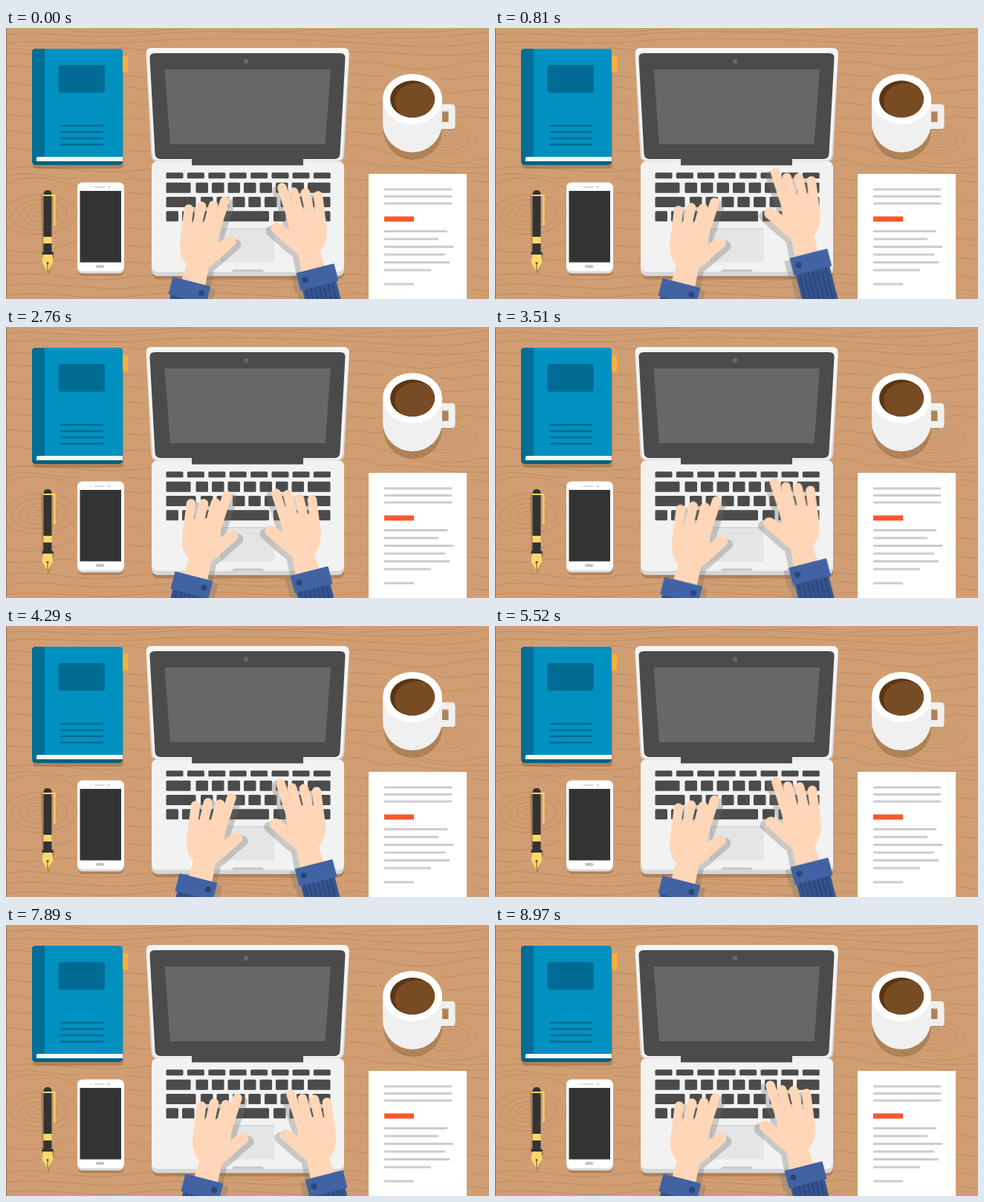
An HTML page without scripts that plays this animation: 650x366 px, repeating every 9000 ms.

```html
<!DOCTYPE html>
<html lang="en">
<head>
<meta charset="utf-8">
<title>Typing at a desk</title>
<style>
html, body { margin: 0; width: 100%; height: 100%; overflow: hidden; background: #d09e72; }
svg { display: block; width: 650px; height: 366px; }

.grain { fill: none; stroke: #ba8a5f; stroke-width: .8; }
.shade { fill: #5b3a1c; opacity: .27; }
.keys { fill: #4b4b4b; }
.keys rect { height: 14px; rx: 1.5px; }
.keys rect:not([width]) { width: 16.5px; }
.keys .low rect { width: 23px; height: 8px; }
.text { stroke: #ccc; stroke-width: 3; }

.left { animation: left 9s ease-in-out infinite; filter: drop-shadow(7px 4px 0 rgba(112, 116, 108, .32)); }
.right { animation: right 9s ease-in-out infinite; filter: drop-shadow(-7px 4px 0 rgba(112, 116, 108, .32)); }

.finger { stroke: #ffd7b8; stroke-width: 12.5; stroke-linecap: round; }
.finger line { --a: 5px; animation: tap 3s ease-in-out infinite; }
.finger .steady { animation-name: drum; }

@keyframes tap {
  0%, 14%, 100% { transform: none; }
  7% { transform: translateY(var(--a)); }
}
@keyframes drum {
  0%, 33%, 73%, 100% { transform: none; }
  23%, 43%, 63% { transform: translateY(3px); }
  53% { transform: translateY(2px); }
  92% { transform: translateY(4px); }
}
@keyframes left {
  0% { transform: translate(0, 0); }
  4.5% { transform: translate(-7px, -3px); }
  11% { transform: translate(3px, 3px); }
  18.33% { transform: translate(7px, 8px); }
  25% { transform: translate(-11px, 1px); }
  30.67% { transform: translate(3px, -6px); }
  35% { transform: translate(-1px, 0); }
  41.7% { transform: translate(6px, 2px); }
  47.67% { transform: translate(9px, -2px); }
  58% { transform: translate(1px, 3px); }
  66% { transform: translate(1px, -2px); }
  74.33% { transform: translate(5px, -9px); }
  79% { transform: translate(0, -3px); }
  87.67% { transform: translate(17px, 0); }
  95.6% { transform: translate(-7px, 2px); }
  99.67% { transform: translate(2px, 0); }
  100% { transform: translate(0, 0); }
}
@keyframes right {
  0% { transform: translate(0, 0); }
  10.5% { transform: translate(6px, -21px); }
  18.33% { transform: translate(0, -1px); }
  25% { transform: translate(-6px, -7px); }
  30.67% { transform: translate(-8px, 5px); }
  37% { transform: translate(5px, -6px); }
  47.67% { transform: translate(-2px, -3px); }
  57% { transform: translate(7px, -3px); }
  66% { transform: translate(7px, -8px); }
  74.33% { transform: translate(-2px, -14.5px); }
  79% { transform: translate(-2px, -17px); }
  87.67% { transform: translate(12px, 13px); }
  94% { transform: translate(2px, -12px); }
  99.67% { transform: translate(-1px, 1px); }
  100% { transform: translate(0, 0); }
}
</style>
</head>
<body>
<svg viewBox="0 0 650 366">
<defs>
  <clipPath id="brew"><ellipse cx="547" cy="96" rx="30" ry="25"/></clipPath>
  <g id="arm">
    <path fill="#ffd7b8" d="M238 266L234.300 286C233 301 236 312 243 319L235 345L267 354L273 323C281 317 287 312 292 307L308 293C313 286 305 278 297 282L285 291L288 263Z"/>
    <g transform="translate(224.500 336) rotate(14.300)">
      <path fill="#36558f" d="M3 20H50V95H3Z"/>
      <path stroke="#284579" stroke-width="1.600" d="M9 22V95M15 22V95M21 22V95M27 22V95M33 22V95M39 22V95M45 22V95"/>
      <rect width="52.500" height="24.500" rx="1" fill="#4163a3"/>
      <circle cx="43" cy="11.700" r="4" fill="#294679"/>
    </g>
  </g>
  <g id="knot">
    <ellipse rx="7" ry="4"/>
    <ellipse rx="15" ry="9"/>
    <path d="M-26 2C-22-15 14-20 25-3C30 14-18 23-26 2Z"/>
    <path d="M-38 3C-30-23 22-29 38-5C43 21-26 33-38 3Z"/>
    <path d="M-54 4C-38-34 30-38 52-6C56 29-34 41-54 4Z"/>
  </g>
</defs>

<rect width="650" height="366" fill="#d09e72"/>
<g class="grain">
  <path d="M0 9C50 2 92 17 190 9S350 4 430 10S560 16 650 5"/>
  <path d="M0 20C60 14 120 25 190 18S390 15 470 20S590 30 650 17"/>
  <path d="M80 2C130 10 190 4 245 1M300 5C350 10 400 0 450 3M470 10C520 2 570 9 620 1"/>
  <path d="M0 35C20 31 30 38 40 35M150 29C166 24 178 32 192 29M458 33C510 27 560 46 650 32"/>
  <path d="M0 52C16 49 24 55 38 52M157 66C170 61 182 70 194 65M459 46C500 40 535 62 582 54S625 42 650 46"/>
  <path d="M0 75C14 71 22 80 38 76M157 82C174 77 182 87 196 82M457 64C475 60 490 67 511 64M582 68C608 74 626 62 650 65"/>
  <path d="M0 96C16 92 26 101 38 97M157 103C172 97 184 108 197 101M457 82C476 77 490 85 509 82M588 86C610 92 630 80 650 84"/>
  <path d="M0 119C14 115 24 123 38 118M157 124C170 118 182 129 198 122M456 103C472 97 490 108 508 101M604 108C620 104 634 111 650 107"/>
  <path d="M0 140C12 136 25 145 38 140M157 146C172 141 182 150 199 144M455 122C472 117 490 128 508 120M604 123C622 114 636 124 650 121"/>
  <path d="M0 163C14 159 26 168 38 162M157 168C172 162 184 171 200 165M453 143C475 135 490 148 510 141S530 177 580 182S630 172 650 178"/>
  <path d="M0 190C60 181 116 203 196 190M0 200C40 190 70 207 97 202M455 160C482 153 500 167 518 169S570 196 650 187"/>
  <path d="M0 211C26 196 69 201 96 217M158 205C172 199 184 211 196 204M455 180C478 172 492 190 520 187S580 199 650 196"/>
  <path d="M158 224C170 218 184 229 196 222M455 205C466 200 477 209 488 204M620 208C632 203 640 211 650 207"/>
  <path d="M158 247C170 240 184 252 196 245M455 230C466 224 477 234 488 228M620 234C632 228 640 238 650 232"/>
  <path d="M158 272C172 266 184 276 196 270M455 255C466 250 478 260 488 253M620 260C632 253 640 263 650 258"/>
  <path d="M0 298C22 308 60 302 96 287M158 296C172 290 182 301 196 294M455 281C466 275 478 285 488 279M620 286C632 281 640 290 650 285"/>
  <path d="M0 316C30 324 70 309 97 315M158 318C172 312 184 323 196 317M455 307C466 301 478 312 488 306M620 312C632 306 640 317 650 310"/>
  <path d="M0 334C60 325 98 348 160 337S300 351 370 342S455 329 488 335M620 337C632 331 640 341 650 336"/>
  <path d="M0 348C60 340 120 358 190 349S350 355 410 350S462 341 488 348M620 355C632 350 640 358 650 354"/>
  <path d="M0 361C60 354 110 370 180 361S340 362 400 364S462 354 488 360"/>
  <use href="#knot" x="44" y="252"/>
  <use href="#knot" transform="translate(595 151) scale(.72)"/>
</g>
<path d="M.5 0V366" stroke="#8f7158"/>

<!-- notebook -->
<rect class="shade" x="36" y="40" width="122" height="150" rx="5"/>
<rect x="152" y="38" width="12" height="22" fill="#fbb03b"/>
<rect x="35" y="28" width="122" height="157" rx="5" fill="#00627f"/>
<path fill="#0091c1" d="M40 28H152Q157 28 157 33V174H35V33Q35 28 40 28Z"/>
<path fill="#006e96" d="M40 28H52V174H41V180H35V33Q35 28 40 28Z"/>
<path fill="#f7f7f7" d="M43 174H157V180H41V176Q41 174 43 174Z"/>
<rect x="70.500" y="50" width="62.500" height="37.500" rx="4" fill="#006b92"/>
<path stroke="#006b92" stroke-width="2.600" d="M73 132H131M73 140.500H131M73 149H131M73 157.500H131"/>

<!-- pen -->
<path class="shade" d="M47 226H61V303H65V309L57 334L49 309Z"/>
<path fill="#333" d="M50.500 282V224Q51 219 56 219T61.500 224V282ZM50.500 291H61.500V302.500H63.500V306H48.500V302.500H50.500Z"/>
<path fill="#fbd86b" d="M50.500 282H61.500V291H50.500ZM50 306H62L63.500 316L56 330L48.500 316Z"/>
<path fill="none" stroke="#fbd86b" stroke-width="2" d="M50 226H65.500V267"/>
<path stroke="#6b5326" d="M56 318V329"/>
<circle cx="56" cy="317.500" r="1.600" fill="#6b5326"/>

<!-- phone -->
<rect class="shade" x="97" y="216" width="62" height="119" rx="7"/>
<rect x="96" y="209" width="63" height="122.500" rx="7" fill="#dcdcdc"/>
<rect x="96" y="208.500" width="63" height="120" rx="7" fill="#fff"/>
<rect x="99.500" y="220" width="55.500" height="96.500" fill="#333"/>
<rect x="121" y="320" width="11.500" height="4" rx="2" fill="#c4c4c4"/>
<path stroke="#ccc" stroke-width="1.500" stroke-linecap="round" d="M119 215H132"/>
<circle cx="138.500" cy="215" r="1.500" fill="#ccc"/>
<circle cx="114" cy="215" r=".8" fill="#ccc"/>

<!-- laptop -->
<rect class="shade" x="197" y="200" width="258" height="139.500" rx="8"/>
<path fill="#d9d9d9" d="M196 27H454Q462 27 462 36L455 172Q454 180 447 180H203Q196 180 195.500 172L188.500 36Q188 27 196 27Z"/>
<path fill="#f5f5f5" d="M196 27H454Q462 27 461.500 35L453 171Q452 179 445 179H205Q198 179 197.500 171L189 35Q188 27 196 27Z"/>
<path fill="#4b4b4b" d="M200 34H450Q457 34 456.500 41L449.500 170Q449 177 442 177H208Q201 177 200.500 170L193.500 41Q193 34 200 34Z"/>
<path fill="#676767" d="M213.500 56H437L429.500 157H221Z"/>
<circle cx="323" cy="45" r="3.300" fill="#676767"/>
<rect x="196" y="180" width="259" height="155" rx="8" fill="#d6d6d6"/>
<rect x="196" y="180" width="259" height="149.500" rx="8" fill="#f2f2f2"/>
<path fill="#4b4b4b" d="M250 176H400V185.500H250Z"/>
<g class="keys">
  <g class="low" transform="translate(0 195.300)">
    <rect x="215.500"/><rect x="243.900"/><rect x="272.300"/><rect x="300.700"/>
    <rect x="329.100"/><rect x="357.500"/><rect x="385.500"/><rect x="413.800"/>
  </g>
  <g transform="translate(0 208.700)">
    <rect x="215.500" width="33"/><rect x="255.500"/><rect x="277"/><rect x="298.500"/><rect x="320"/>
    <rect x="341.500"/><rect x="363"/><rect x="384.500"/><rect x="406" width="30.500"/>
  </g>
  <g transform="translate(0 228)">
    <rect x="215.500" width="40"/><rect x="262"/><rect x="283.500"/><rect x="305"/><rect x="326.300"/>
    <rect x="348"/><rect x="369.500"/><rect x="391"/><rect x="412.500" width="24"/>
  </g>
  <g transform="translate(0 247.300)">
    <rect x="215.500"/><rect x="237"/><rect x="258.500" width="95.500"/>
    <rect x="360"/><rect x="381.500"/><rect x="403" width="33.500"/>
  </g>
</g>
<rect x="290" y="271" width="71.500" height="45.500" fill="#e5e5e5"/>
<path fill="none" stroke="#d2d2d2" stroke-width="1.500" d="M290.500 316V271H361"/>
<path fill="#c9c9c9" d="M304 329.500Q304 326 308 326H343Q347 326 347 329.500Z"/>

<!-- coffee -->
<path class="shade" d="M508 105V138A39.500 40 0 0 0 587 138H600V115Z"/>
<path fill="#f0f0f0" fill-rule="evenodd" d="M580 103H600Q604.500 103 604.500 108V132Q604.500 136.500 600 136.500H580ZM587 112.500V127H595.500V112.500Z"/>
<path fill="#f0f0f0" d="M507 96H587V128A40 40 0 0 1 507 128Z"/>
<ellipse cx="547" cy="96" rx="40" ry="34" fill="#fff"/>
<g clip-path="url(#brew)">
  <path fill="#5b3612" d="M510 65H585V125H510Z"/>
  <ellipse cx="553" cy="99.500" rx="30" ry="25" fill="#774b23"/>
</g>

<!-- paper -->
<path fill="#fff" d="M488 197H620V366H488Z"/>
<path class="text" d="M509 218H600M509 227.500H600M509 237H600M509 274.500H594M509 285H582M509 295.500H602M509 306H591M509 316.500H597M509 327H572M509 346H549"/>
<path fill="#f9572b" d="M509 254.500H549V261.500H509Z"/>

<!-- hands -->
<g class="left">
  <g class="finger">
    <line x1="246" y1="244.500" x2="241" y2="285" style="--a:3px;animation-delay:-2.860s"/>
    <line x1="263" y1="240.500" x2="253" y2="285" style="--a:4px;animation-delay:-.450s"/>
    <line x1="279" y1="239.500" x2="267" y2="285" class="steady"/>
    <line x1="294.500" y1="233.500" x2="278" y2="285" style="--a:6px;animation-delay:-1.560s"/>
  </g>
  <use href="#arm"/>
</g>
<g class="right">
  <g transform="translate(666 -18) scale(-1 1)">
    <g class="finger">
      <line x1="246" y1="244.500" x2="241" y2="285" style="--a:3px;animation-delay:-.550s"/>
      <line x1="263" y1="240.500" x2="253" y2="285" style="--a:4px;animation-delay:-.450s"/>
      <line x1="279" y1="239.500" x2="267" y2="285" style="animation-delay:-2.240s"/>
      <line x1="294.500" y1="233.500" x2="278" y2="285" style="--a:4px;animation-delay:-.450s"/>
    </g>
    <use href="#arm"/>
  </g>
</g>
</svg>
</body>
</html>
```
